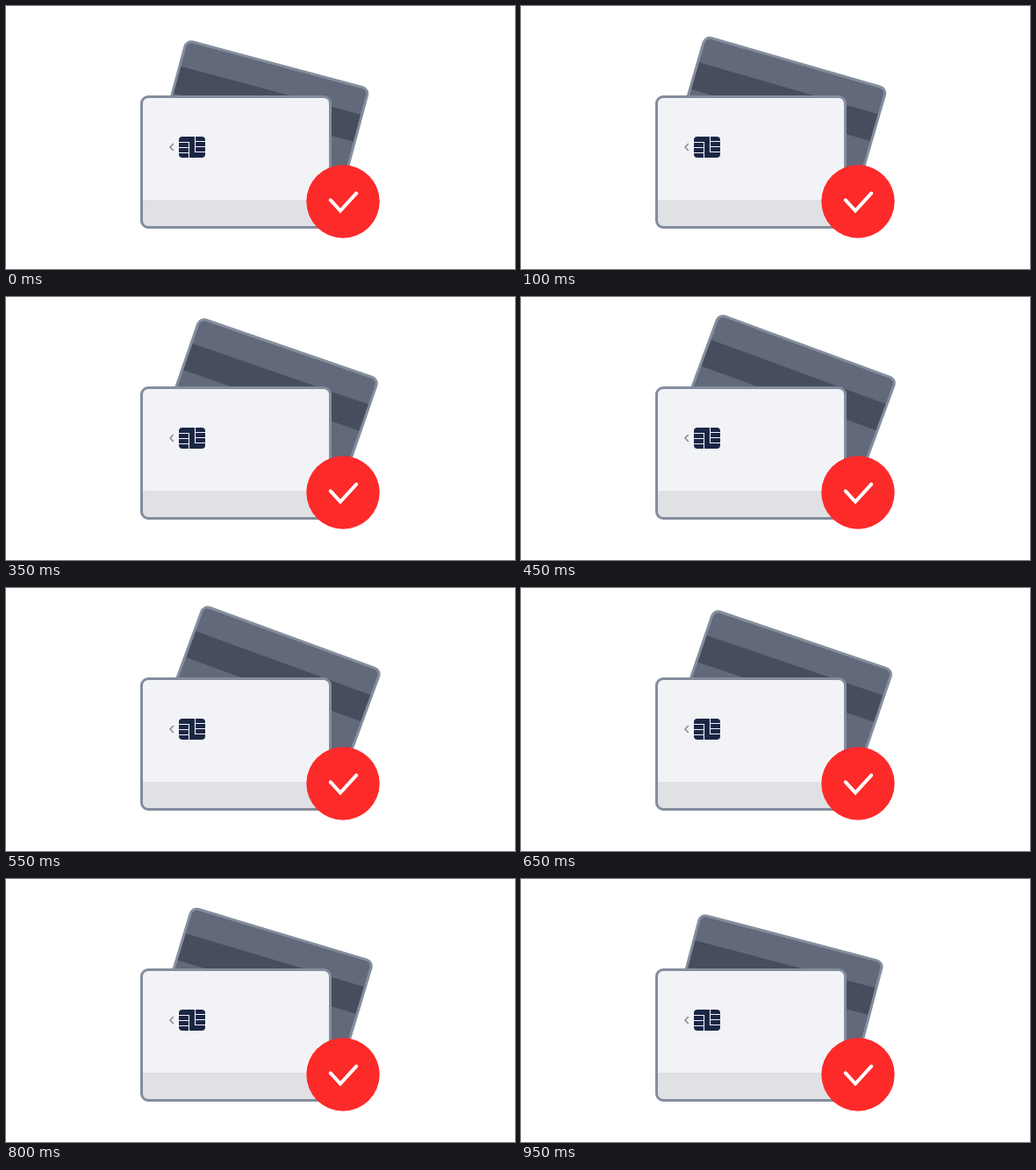
Write an HTML page that moves like this. It is 580 by 300 pixels and loops after 1000 ms.

```html
<!DOCTYPE html>
<html lang="en">
<head>
<meta charset="utf-8">
<title>Cards</title>
<style>
  html, body { margin: 0; width: 100%; height: 100%; overflow: hidden; background: #fff; }
  svg { display: block; }
</style>
</head>
<body>
<svg width="580" height="300" viewBox="0 0 580 300" fill="none">
  <g id="back">
    <!-- resting tilt; the outer group swings around a point at the lower right -->
    <g transform="translate(204.7 37.2) rotate(15)">
      <rect x="1.5" y="1.5" width="215" height="149" rx="7.5" fill="#62697b"/>
      <path d="M2 32H216V64H2Z" fill="#474d5c"/>
      <rect x="1.5" y="1.5" width="215" height="149" rx="7.5" stroke="#848f9d" stroke-width="3"/>
    </g>
  </g>

  <rect x="154.5" y="103.5" width="215" height="149" rx="7.5" fill="#f2f3f6"/>
  <path d="M155 221H369V245a7 7 0 0 1-7 7H162a7 7 0 0 1-7-7Z" fill="#e0e1e5"/>
  <rect x="154.5" y="103.5" width="215" height="149" rx="7.5" stroke="#838d9d" stroke-width="3"/>

  <path d="M190.8 157L187 161L190.8 165" stroke="#8b8d91" stroke-width="1.6"/>
  <rect x="197" y="149" width="30" height="24" rx="4" fill="#1b2645"/>
  <path d="M197 155.5H208.5V173M197 161.5H208.5M197 167.5H208.5
           M215.5 149V166.5H227M215.5 160.5H227M215.5 154.5H227" stroke="#f2f3f6" stroke-width="1.1"/>

  <circle cx="384" cy="223" r="41.7" fill="#fd2a2a"/>
  <path d="M369.8 221.3L381 233.6L399.2 213.6" stroke="#fff" stroke-width="4" stroke-linecap="round"/>
</svg>
<script>
  const back = document.getElementById("back");
  const STEP = 50, LOOP = 1000;
  // [time in ms, swing in degrees]
  const keys = [[0, 0], [500, 5.8], [950, -0.3], [LOOP, 0]];

  function swing(t) {
    const i = keys.findIndex(k => k[0] > t);
    const [t0, a0] = keys[i - 1], [t1, a1] = keys[i];
    return a0 + (a1 - a0) * (t - t0) / (t1 - t0);
  }

  let start;
  function draw(now) {
    start ??= now;
    const t = Math.floor((now - start) % LOOP / STEP) * STEP;
    back.setAttribute("transform", `rotate(${swing(t)} 429 248)`);
    requestAnimationFrame(draw);
  }
  requestAnimationFrame(draw);
</script>
</body>
</html>
```
